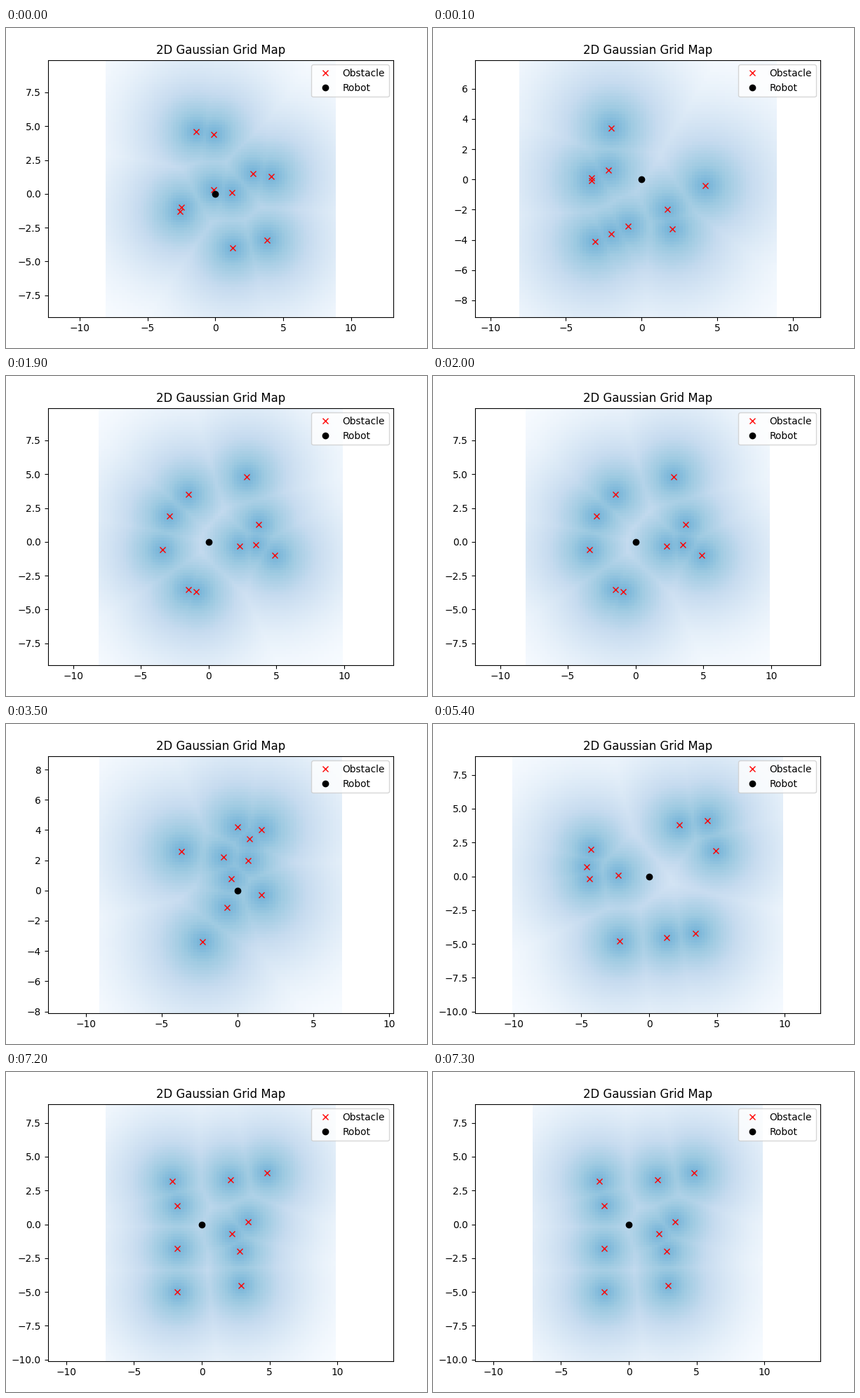
A matplotlib script that plays this animation: 600x457 px, repeating every 8000 ms.

```python
import math

import matplotlib.pyplot as plt
import numpy as np
from matplotlib.animation import FuncAnimation

WIDTH, HEIGHT, DPI = 600, 457, 100
INTERVAL = 100
FRAMES = 80
LEFT, TOP, BOX_W, BOX_H = 59.8, 45.6, 492.6, 367.1  # axes box in pixels
CELL = 0.2
STD = 5.0
EXTEND = 5.0

plt.rcParams["font.size"] = 9.93

# Start in ms, the step shared by all rows, then rows as x, y[, count]
SCENES = [
    (0, (1.3, -0.2), [(-1.4, 4.6, 2), (2.8, 1.5, 2), (-0.1, 0.3, 2),
                      (-2.5, -1), (-2.6, -1.3), (1.3, -4), (3.8, -3.4)]),
    (100, (1.1, 0.5), [(-3.1, -4.1, 3), (-3.3, 0.1, 2), (-3.3, -0.1),
                       (-2, 3.4), (1.7, -2), (2, -3.3), (4.2, -0.4)]),
    (1900, (-1.4, -1.6), [(-1.5, 3.5, 2), (3.7, 1.3, 2), (2.8, 4.8), (3.5, -0.2),
                          (4.9, -1), (-3.4, -0.6), (-1.5, -3.5), (-0.9, -3.7)]),
    (3500, (-0.9, -2), [(0, 4.2, 2), (1.6, 4, 2), (0.8, 3.4), (-3.7, 2.6),
                        (-0.4, 0.8), (1.6, -0.3), (-0.7, -1.1), (-2.3, -3.4)]),
    (5400, (2.1, 0.3), [(2.2, 3.8, 2), (1.3, -4.5, 2), (-4.4, -0.2, 2),
                        (4.9, 1.9), (-4.3, 2), (-4.6, 0.7), (-2.2, -4.8)]),
    (7200, (0, -3.2), [(-1.8, 1.4, 3), (-2.2, 3.2), (2.1, 3.3), (4.8, 3.8),
                       (3.4, 0.2), (2.2, -0.7), (2.8, -2), (2.9, -4.5)]),
]

erf = np.vectorize(math.erf)


def row(step, x, y, count=1):
    """Evenly spaced obstacles along the scene's step."""
    return [(x + i * step[0], y + i * step[1]) for i in range(count)]


def axis_cells(values):
    """Cell centres along one axis, covering the obstacles plus a margin."""
    low, high = round(min(values) - EXTEND), round(max(values) + EXTEND)
    return low + CELL * np.arange(round((high - low) / CELL))


def cell_edges(centres):
    return np.append(centres, centres[-1] + CELL) - CELL / 2


def build_map(step, rows):
    """Tail probability of the distance to the nearest obstacle."""
    points = [point for spec in rows for point in row(step, *spec)]
    ox, oy = np.array(points).T
    xs, ys = axis_cells(ox), axis_cells(oy)
    gx, gy = np.meshgrid(xs, ys)
    nearest = np.min([np.hypot(gx - x, gy - y) for x, y in points], axis=0)
    prob = 0.5 * (1 - erf(nearest / (STD * math.sqrt(2))))
    return ox, oy, cell_edges(xs), cell_edges(ys), prob


starts = [start for start, _, _ in SCENES]
maps = [build_map(step, rows) for _, step, rows in SCENES]

fig = plt.figure(figsize=(WIDTH / DPI, HEIGHT / DPI), dpi=DPI)
ax = fig.add_axes([LEFT / WIDTH, 1 - (TOP + BOX_H) / HEIGHT,
                   BOX_W / WIDTH, BOX_H / HEIGHT])


def draw(frame):
    scene = np.searchsorted(starts, frame * INTERVAL, side="right") - 1
    ox, oy, xe, ye, prob = maps[scene]
    ax.clear()
    ax.pcolormesh(xe, ye, prob, vmax=1.0, cmap="Blues")
    ax.plot(ox, oy, "xr", label="Obstacle")
    ax.plot(0, 0, "ok", label="Robot")
    # equal scale on both axes, map centred horizontally
    half = (ye[-1] - ye[0]) * BOX_W / BOX_H / 2
    mid = (xe[0] + xe[-1]) / 2
    ax.set_xlim(mid - half, mid + half)
    ax.set_ylim(ye[0], ye[-1])
    ax.set_title("2D Gaussian Grid Map")
    ax.legend(loc="upper right")
    return []


anim = FuncAnimation(fig, draw, frames=FRAMES, interval=INTERVAL,
                     init_func=lambda: draw(0), repeat=True, repeat_delay=0)
plt.show()
```
